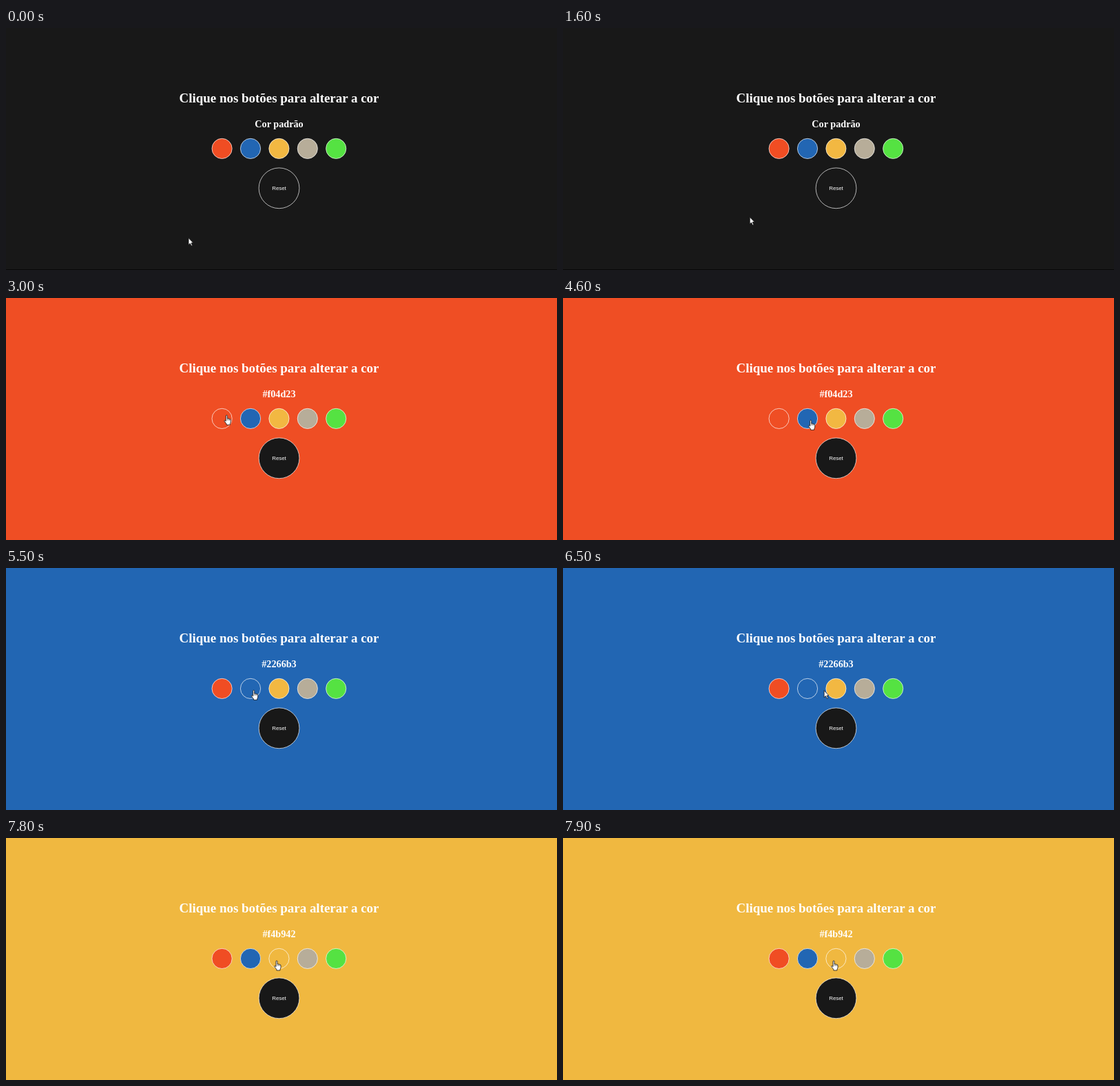
An HTML page for the animation above (8000 ms loop, 800 px wide and 351 px high).

```html
<!DOCTYPE html>
<html lang="pt-BR">
<head>
<meta charset="utf-8">
<title>Alterar a cor</title>
<style>
  html, body { margin: 0; width: 100%; height: 100%; overflow: hidden; background: #181818; }
  svg { display: block; width: 100%; height: 100%; }
  text { fill: #fff; text-anchor: middle; }
  .serif { font-family: "Liberation Serif", "Times New Roman", serif; font-weight: bold; }
  .sans { font-family: "Liberation Sans", Arial, sans-serif; }
  circle { stroke: #fff; stroke-opacity: .85; stroke-width: .8; }
  .cursor { fill: #fff; stroke: #111; stroke-width: .8; stroke-linejoin: round; }
</style>
</head>
<body>
<svg viewBox="0 0 800 351">
  <rect id="bg" width="800" height="351"/>
  <rect id="edge" y="350" width="800" height="1" fill="#080808"/>
  <text class="serif" x="396.5" y="107.8" font-size="18.95">Clique nos botões para alterar a cor</text>
  <text class="serif" id="label" x="396.5" y="143.6" font-size="14.2"></text>
  <g id="buttons"></g>
  <circle cx="396.5" cy="232.3" r="29.4" fill="#181818"/>
  <text class="sans" x="396.5" y="234.9" font-size="7.9">Reset</text>
  <g id="cursor" class="cursor">
    <path id="arrow" d="M0 0V10L2.3 7.9L4 11.6L5.6 10.9L4 7.3H7Z"/>
    <g id="hand">
      <path d="M-1 1Q-1 0 0 0T1 1V5Q1.4 4.3 2.5 5Q3.4 4.6 4.1 5.6Q5.9 5.3 6 7V9.6Q5.9 11.2 5 12.3V14H-.2V12.6L-3.2 8.7Q-3.6 7.4-2.3 7.5L-1 8.6Z"/>
      <path d="M1 5V7.6M2.6 5.2V7.6M4.2 5.7V7.8" fill="none" stroke-width=".5"/>
    </g>
  </g>
</svg>
<script>
const LOOP = 8000, STEP = 100;
const el = id => document.getElementById(id);

const swatches = ['#f04d23', '#2266b3', '#f2b842', '#b7ad99', '#55e242'];
const centers = swatches.map((_, i) => 313.6 + 41.4 * i);

const themes = [
  { at: 0, color: '#181818', label: 'Cor padrão' },
  { at: 3000, color: '#ef4e24', label: '#f04d23' },
  { at: 5500, color: '#2266b3', label: '#2266b3' },
  { at: 7800, color: '#f0b840', label: '#f4b942' }
];

const start = [265, 304.5];
const moves = [
  { at: 100, steps: 2, to: [269, 279] },
  { at: 1600, steps: 8, to: [320.3, 170] },
  { at: 3900, steps: 8, to: [359.7, 177.3] },
  { at: 6100, steps: 9, to: [393, 178] }
];

const circles = swatches.map((color, i) => {
  const c = document.createElementNS('http://www.w3.org/2000/svg', 'circle');
  c.setAttribute('cx', centers[i]);
  c.setAttribute('cy', 174.9);
  c.setAttribute('r', 14.6);
  el('buttons').append(c);
  return c;
});

const ease = p => p * p * (3 - 2 * p);

function pointer(t) {
  let pos = start;
  for (const { at, steps, to } of moves) {
    if (t < at) break;
    const p = ease(Math.min(1, ((t - at) / STEP + 1) / steps));
    pos = pos.map((v, i) => v + (to[i] - v) * p);
  }
  return pos;
}

function overButton([x, y]) {
  return centers.some(cx => Math.hypot(x - cx, y - 174.9) < 15) ||
    Math.hypot(x - 396.5, y - 232.3) < 29.8;
}

function draw(time) {
  const t = Math.floor((time % LOOP) / STEP) * STEP;
  const theme = themes.filter(s => s.at <= t).pop();
  el('bg').setAttribute('fill', theme.color);
  el('edge').style.display = theme.at ? 'none' : '';
  el('label').textContent = theme.label;
  circles.forEach((c, i) => {
    const active = themes[i + 1] === theme;
    c.setAttribute('fill', active ? theme.color : swatches[i]);
  });

  const pos = pointer(t), over = overButton(pos);
  el('cursor').setAttribute('transform', `translate(${pos})`);
  el('arrow').style.display = over ? 'none' : '';
  el('hand').style.display = over ? '' : 'none';
}

const begin = performance.now();
function tick() {
  draw(performance.now() - begin);
  requestAnimationFrame(tick);
}
tick();
</script>
</body>
</html>
```
